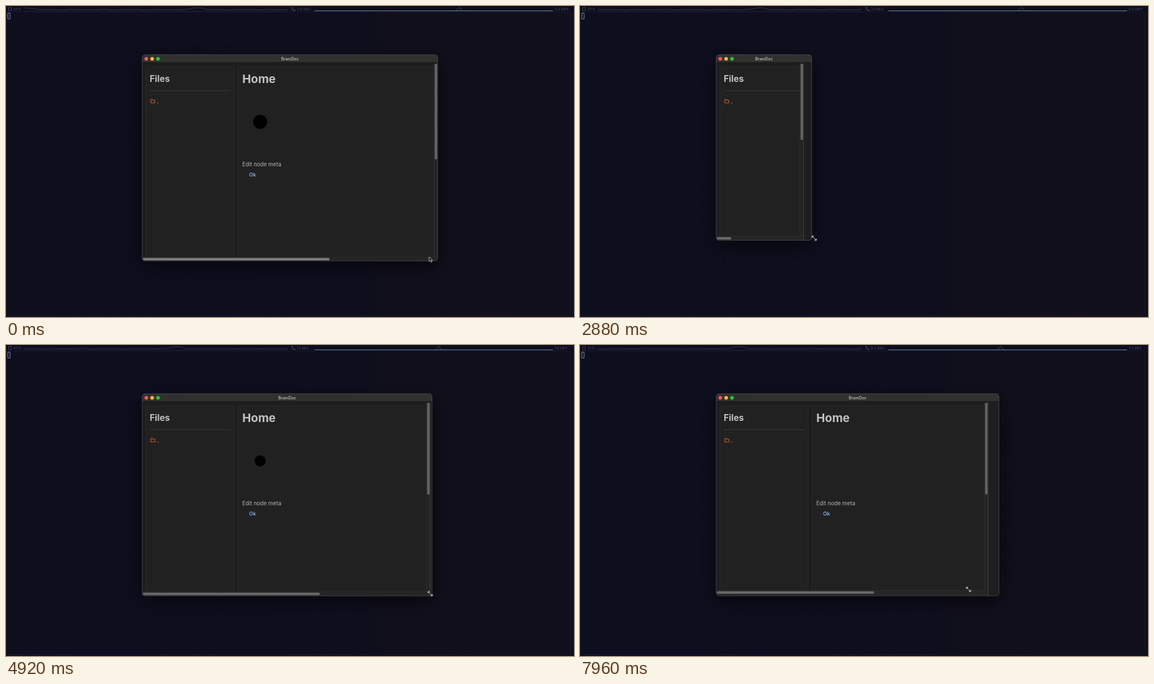
An HTML page with a canvas that plays this animation: 1000 px wide and 549 px high, repeating every 8000 ms.

```html
<!DOCTYPE html>
<html lang="en">
<head>
<meta charset="utf-8">
<title>Window resize</title>
<style>
html, body { margin: 0; width: 100%; height: 100%; overflow: hidden; background: #0e0e1e; }
canvas { display: block; width: 1000px; height: 549px; }
</style>
</head>
<body>
<canvas id="stage" width="1000" height="549"></canvas>
<script>
const c = document.getElementById('stage').getContext('2d');
const LOOP = 8000, STEP = 40, LEFT = 240, TOP = 86, BODY = 100.5;

// where the dragged corner rests or turns: time, x, y
const drag = [
  [200, 760, 450], [1200, 404.5, 410], [1620, 404.5, 410], [2150, 520, 415],
  [2800, 381, 412.9], [3470, 694, 421.5], [3960, 711, 548], [4510, 711, 438],
  [5080, 755, 443.5], [6500, 755, 443.5], [7150, 790, 545], [7700, 799, 452], [8300, 599, 422]
];
const hover = [[40, 745, 443], [200, 756, 446], [5100, 751, 440], [5640, 447, 267], [5880, 447, 267], [6290, 754, 422]];
const readings = ['37% 2.0 2.0', '41% 0.0 0.0', '47% 3.1 0.0', '47% 12 20', '44% 7.2 13', '37% 8.2 7.2'];

// eased point between the two keys around t
function at(keys, t) {
  let i = 0;
  while (i < keys.length - 2 && t > keys[i + 1][0]) i++;
  const [t0, x0, y0] = keys[i], [t1, x1, y1] = keys[i + 1];
  const u = Math.max(0, Math.min(1, (t - t0) / (t1 - t0)));
  const k = u * u * (3 - 2 * u);
  return [x0 + (x1 - x0) * k, y0 + (y1 - y0) * k];
}
function rect(x, y, w, h, color) {
  c.fillStyle = color;
  c.fillRect(x, y, w, h);
}
function round(x, y, w, h, r) {
  c.beginPath();
  c.roundRect(x, y, Math.max(0, w), Math.max(0, h), r);
}
function fill(color) { c.fillStyle = color; c.fill(); }
function stroke(color, width = 1) { c.strokeStyle = color; c.lineWidth = width; c.stroke(); }
function trace(points) {
  c.beginPath();
  points.forEach(([x, y]) => c.lineTo(x, y));
}
function path(points, color, width) {
  trace(points);
  stroke(color, width);
}
function shape(points, width) {
  trace(points);
  c.closePath();
  fill('#000');
  stroke('#e6e6e6', width);
}
function dot(x, y, r, color) {
  c.beginPath();
  c.arc(x, y, r, 0, 7);
  fill(color);
}
function text(s, x, y, font, color, align = 'left') {
  c.font = font + ' Inter, sans-serif';
  c.fillStyle = color;
  c.textAlign = align;
  c.fillText(s, x, y);
}

function backdrop() {
  const g = c.createLinearGradient(0, 0, 1000, 0);
  g.addColorStop(0, '#0d0e1e');
  g.addColorStop(0.63, '#0e0e1d');
  g.addColorStop(0.67, '#100f1b');
  g.addColorStop(1, '#110f1b');
  rect(0, 0, 1000, 549, g);
  rect(0, 0, 1000, 10, '#0e0e1c');
  rect(993, 11, 7, 538, '#10111f');
  path([[993, 10.5], [0.5, 10.5], [0.5, 546.5], [993, 546.5]], '#191a2e');
  path([[993.5, 11], [993.5, 547]], '#171829');
  round(3.2, 12.5, 4, 10.5, 0.5);
  stroke('#9aa2c4', 0.9);
}

function loadY(x) {
  const i = x / 5.2;
  const bump = (mid, size, w) => size * Math.exp(-(((x - mid) / w) ** 4));
  return 6.4 + 0.5 * Math.sin(i * 0.9) * Math.sin(i * 0.23) - bump(337, 3.4, 12) - bump(38, 2.8, 14);
}

function statusBar(t) {
  const tick = Math.floor((t + 100) / 700);
  const shift = tick * 5.2;
  const [cpu, down, up] = readings[Math.min(5, tick < 2 ? tick : tick >> 1)].split(' ');
  const ink = '#4a4870', font = '6.5px';
  round(4.5, 2.5, 5, 6, 1);
  stroke(ink);
  text(cpu, 13, 8, font, ink);
  path([[31, 9], [496, 9]], '#29283f', 0.8);
  const line = [];
  for (let x = 31; x <= 496; x += 5) line.push([x, loadY(x + shift)]);
  path(line, '#3d3b5e', 0.9);
  c.strokeStyle = ink;
  c.lineWidth = 0.8;
  c.strokeRect(503, 2.5, 2, 2);
  c.strokeRect(507, 6.5, 2, 2);
  path([[504, 4.5], [504, 7.5], [507, 7.5]], ink, 0.8);
  text(down + ' kB↓', 512, 8, font, ink);
  const peak = 798 - shift;
  path([[543, 8.5], [963, 8.5]], '#6c90b0');
  path([[peak - 6, 8.5], [peak, 2.3], [peak + 6, 8.5]], '#47557c', 0.9);
  text(up + ' kB↑', 966, 8, font, ink);
}

function page(webR, webB, hasBar, t) {
  c.save();
  c.beginPath();
  c.rect(LEFT, BODY, webR - 6.5 - LEFT, webB - (hasBar ? 7 : 0) - BODY);
  c.clip();
  rect(LEFT, BODY, webR - LEFT, webB - BODY, '#1e1e1e');
  for (const [x, w] of [[246.5, 155], [408.5, 640]]) {
    round(x, 107.5, w, 700, 2);
    fill('#212121');
    stroke('#292929');
  }
  const ink = '#c2c2c2';
  text('Files', 253, 134, 'bold 15.5px', ink);
  path([[253, 149.5], [395, 149.5]], '#373737');
  path([[248, 156], [401, 156]], '#252525');
  c.lineJoin = 'round';
  trace([[255, 165], [257.6, 165], [258.8, 166.2], [262, 166.2], [262, 171], [255, 171]]);
  c.closePath();
  stroke('#d4661f', 1.1);
  text('.', 266, 171.5, '10px', '#dddddd');
  text('Home', 416, 136, 'bold 20.5px', ink);
  dot(447.5, 204.5, 12.5 * Math.sqrt(Math.max(0, 1 - (t / 6250) ** 4)), '#000');
  text('Edit node meta', 416, 283, '9.7px', '#b4b4b4');
  text('Ok', 428, 301.3, '600 9px', '#83aee6');
  c.restore();
}

function appWindow(t) {
  // the frame is one step larger than the page while either grows or shrinks
  const [webR, webB] = at(drag, t);
  const [before, after] = [at(drag, t - STEP), at(drag, t + STEP)];
  const right = Math.max(webR, before[0], after[0]);
  const bottom = Math.max(webB, before[1], after[1]);
  const w = right - LEFT, h = bottom - TOP, hasBar = bottom - webB < 8;

  c.save();
  c.shadowColor = 'rgba(0,0,0,.6)';
  c.shadowBlur = 34;
  c.shadowOffsetY = 9;
  round(LEFT, TOP, w, h, 5);
  fill('#1e1e1e');
  c.restore();

  c.save();
  round(LEFT, TOP, w, h, 5);
  c.clip();
  rect(LEFT, TOP, w, 14, '#30302f');
  page(webR, webB, hasBar, t);
  rect(webR - 7, BODY, 7, webB - BODY, '#242424');
  path([[webR - 6.5, BODY], [webR - 6.5, webB]], '#2f2f2f');
  if (hasBar) {
    rect(LEFT, webB - 7, webR - LEFT, 7, '#242424');
    path([[LEFT, webB - 6.5], [webR, webB - 6.5]], '#2f2f2f');
    round(LEFT + 1, webB - 5.2, (webR - LEFT - 13) ** 2 / 782, 4.2, 2.1);
    fill(t < STEP ? '#7c7c7c' : '#696969');
  }
  round(webR - 5.2, 102, 4.2, (bottom - 111) ** 2 / 680, 2.1);
  fill('#656565');
  if (right - webR > 2) path([[webR, BODY], [webR, bottom]], '#454545');
  if (hasBar && bottom - webB > 2) path([[LEFT, webB], [webR, webB]], '#3a3a3a');
  rect(LEFT, 99.5, w, 1, '#121212');
  c.restore();

  round(LEFT - 0.2, TOP, w + 0.2, h, 5);
  stroke('#525252', 0.8);
  ['#f4564f', '#f5b82e', '#28c13f'].forEach((color, i) => dot(247 + i * 10.3, 93.2, 3.2, color));
  text('BramDoc', (LEFT + right) / 2, 95.5, '600 7px', '#b6b6b4', 'center');
}

function arrow(x, y) {
  const tip = [[0, 0], [0, 8], [1.9, 6.3], [3.4, 9.3], [4.8, 8.6], [3.4, 5.8], [6, 5.6]];
  shape(tip.map(([dx, dy]) => [x + dx, y + dy]), 0.8);
}

function resizer(x, y) {
  const head = [[0.6, 0.6], [2.5, 2.5], [1, 4], [4, 4], [4, 1], [2.5, 2.5]];
  for (const s of [-1, 1]) shape(head.map(([dx, dy]) => [x + s * dx, y + s * dy]), 0.9);
}

function draw(t) {
  backdrop();
  statusBar(t);
  appWindow(t);
  const dragging = (t > 200 && t < 5100) || t > 6500;
  if (dragging) {
    const [x, y] = at(drag, t + 1.5 * STEP);
    resizer(x - 4.5, y - 4);
  } else {
    arrow(...at(hover, t));
  }
}

const start = performance.now();
function loop() {
  draw((performance.now() - start) % LOOP);
  requestAnimationFrame(loop);
}
loop();
</script>
</body>
</html>
```
